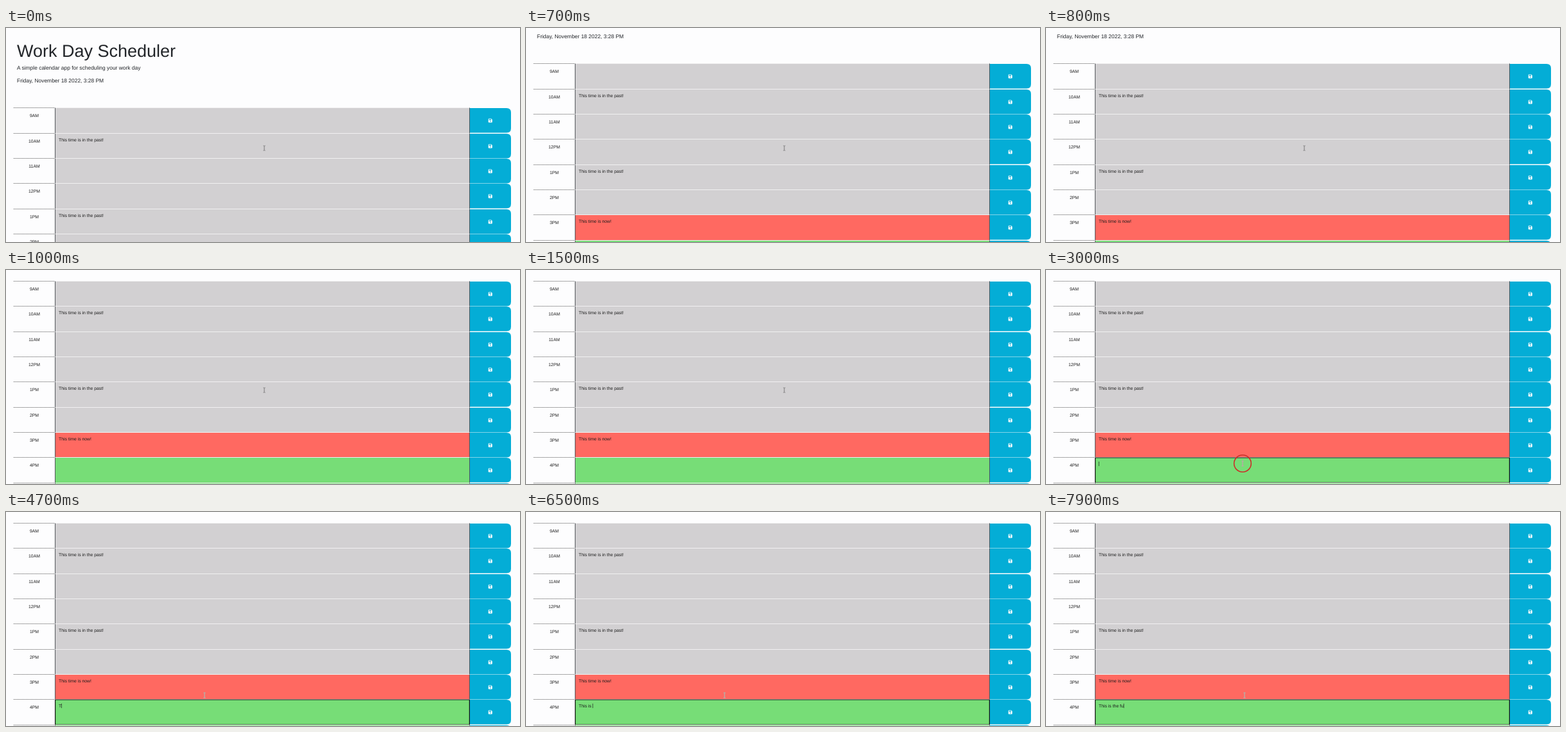
Recreate the animation shown at these times as an HTML page. Size 800 by 334 pixels, loop 8 s.

```html
<!DOCTYPE html>
<html lang="en">
<head>
<meta charset="utf-8">
<title>Work Day Scheduler</title>
<style>
  html, body { margin: 0; width: 100%; height: 100%; overflow: hidden; background: #fdfdfe; }
  svg { display: block; width: 800px; height: 334px; }
  text { font-family: "Liberation Sans", Arial, sans-serif; fill: #222529; text-rendering: geometricPrecision; white-space: pre; }
  .small { font-size: 6.85px; fill: #1c1c1c; }
  .lead { font-size: 8.44px; }
</style>
</head>
<body>
<svg id="stage" viewBox="0 0 800 334"></svg>
<script>
const LOOP = 8000, STEP = 100;
const TOP = 124.4, PITCH = 39.33;
const COLORS = { past: '#d2d0d2', now: '#ff6961', future: '#77dd77' };
const HOURS = ['9AM', '10AM', '11AM', '12PM', '1PM', '2PM', '3PM', '4PM', '5PM'];
const NOTES = { 1: 'This time is in the past!', 4: 'This time is in the past!', 6: 'This time is now!' };
const NOW = 6, EDITED = 7, CLICK = 2900;

// [time, scroll offset]
const SCROLL = [[0, 0], [700, 69], [1000, 107.3]];
// [time, x, y]
const POINTER = [[0, 402, 187.5], [1900, 402, 187.5], [2700, 306, 302], [3700, 306, 302], [3900, 309, 286]];
const PHRASE = 'This is the fu';
const KEYS = [4700, 6000, 6100, 6200, 6300, 6400, 6450, 6500, 6800, 6900, 7100, 7300, 7500, 7900];

const stage = document.getElementById('stage');

function add(parent, tag, attrs, content) {
  const node = document.createElementNS('http://www.w3.org/2000/svg', tag);
  for (const key in attrs) node.setAttribute(key, attrs[key]);
  if (content) node.textContent = content;
  parent.appendChild(node);
  return node;
}

function saveIcon(parent) {
  const icon = add(parent, 'g', { transform: 'translate(750.8 17.4)' });
  add(icon, 'path', { d: 'M.7 0H4.5L6 1.5V5.3Q6 6 5.3 6H.7Q0 6 0 5.3V.7Q0 0 .7 0Z', fill: '#fff' });
  add(icon, 'rect', { x: 1, y: .9, width: 3.3, height: 1.5, fill: '#04add6' });
  add(icon, 'circle', { cx: 3, cy: 4.1, r: .85, fill: '#04add6' });
}

function makeRow(hour, i) {
  const row = add(stage, 'g', {});
  const state = i < NOW ? 'past' : i === NOW ? 'now' : 'future';
  add(row, 'rect', { x: 76, width: 646, height: 40, fill: COLORS[state] });
  add(row, 'rect', { x: 76, width: 646, height: 1, fill: '#f1f0f1' });
  add(row, 'path', { d: 'M76.5 .5V40M721.5 .5V40', stroke: '#54585c' });
  add(row, 'path', { d: 'M12 .5H76', stroke: '#555', 'stroke-dasharray': '1 1' });
  add(row, 'path', { d: 'M722 .9H779Q786 .9 786 7.9V32.5Q786 39.5 779 39.5H722Z', fill: '#04add6' });
  saveIcon(row);
  add(row, 'text', { class: 'small', x: 44, y: 15.4, 'text-anchor': 'middle' }, hour);
  add(row, 'text', { class: 'small', x: 82, y: 12.5 }, NOTES[i]);
  return row;
}

const header = add(stage, 'g', {});
add(header, 'text', { x: 17, y: 45.3, 'font-size': 27 }, 'Work Day Scheduler');
add(header, 'text', { class: 'lead', x: 17, y: 65 }, 'A simple calendar app for scheduling your work day');
add(header, 'text', { class: 'lead', x: 17, y: 84.7 }, 'Friday, November 18 2022, 3:28 PM');

const rows = HOURS.map(makeRow);
const focus = add(rows[EDITED], 'rect', { x: 76.6, y: 1, width: 644.8, height: 39, rx: .8, fill: 'none', stroke: '#111', 'stroke-width': 1.2 });
const typed = add(rows[EDITED], 'text', { class: 'small', x: 82, y: 12.5 });
const caret = add(rows[EDITED], 'rect', { y: 7, width: .7, height: 7, fill: '#222' });

const pointer = add(stage, 'g', {});
const ring = add(pointer, 'circle', { r: 13.3, fill: 'none', stroke: '#cc2f2a', 'stroke-width': 1.6 });
const beam = add(pointer, 'path', { d: 'M-1.5 -3.7H-.5L0 -3.2L.5 -3.7H1.5M0 -3.2V3.2M-1.5 3.7H-.5L0 3.2L.5 3.7H1.5', fill: 'none' });

const show = (node, on) => node.setAttribute('visibility', on ? 'visible' : 'hidden');
const ease = p => p * p * (3 - 2 * p);

function pointerAt(t) {
  const next = POINTER.findIndex(k => k[0] > t);
  if (next < 0) return POINTER[POINTER.length - 1].slice(1);
  const [t0, x0, y0] = POINTER[next - 1], [t1, x1, y1] = POINTER[next];
  const p = ease((t - t0) / (t1 - t0));
  return [x0 + (x1 - x0) * p, y0 + (y1 - y0) * p];
}

function render(t) {
  const scroll = SCROLL.filter(k => k[0] <= t).pop()[1];
  header.setAttribute('transform', `translate(0 ${-scroll})`);
  rows.forEach((row, i) => row.setAttribute('transform', `translate(0 ${Math.round(TOP - scroll + i * PITCH)})`));

  const pressed = KEYS.filter(k => k <= t);
  typed.textContent = PHRASE.slice(0, pressed.length);
  const since = t - (pressed.length ? pressed[pressed.length - 1] : CLICK);
  const width = pressed.length ? typed.getComputedTextLength() : 0;
  caret.setAttribute('x', 81.9 + width);
  show(caret, t >= CLICK && since % 1000 < 500);
  show(focus, t >= CLICK);

  const [x, y] = pointerAt(t);
  const faded = t >= 2500;
  pointer.setAttribute('transform', `translate(${x} ${y})`);
  beam.setAttribute('stroke', faded ? '#b9aba5' : '#626262');
  beam.setAttribute('stroke-width', faded ? 1.4 : .8);
  show(ring, t >= CLICK && t < CLICK + 300);
}

const start = performance.now();
function tick() {
  const t = (performance.now() - start) % LOOP;
  render(Math.floor(t / STEP) * STEP);
  requestAnimationFrame(tick);
}
render(0);
requestAnimationFrame(tick);
</script>
</body>
</html>
```
